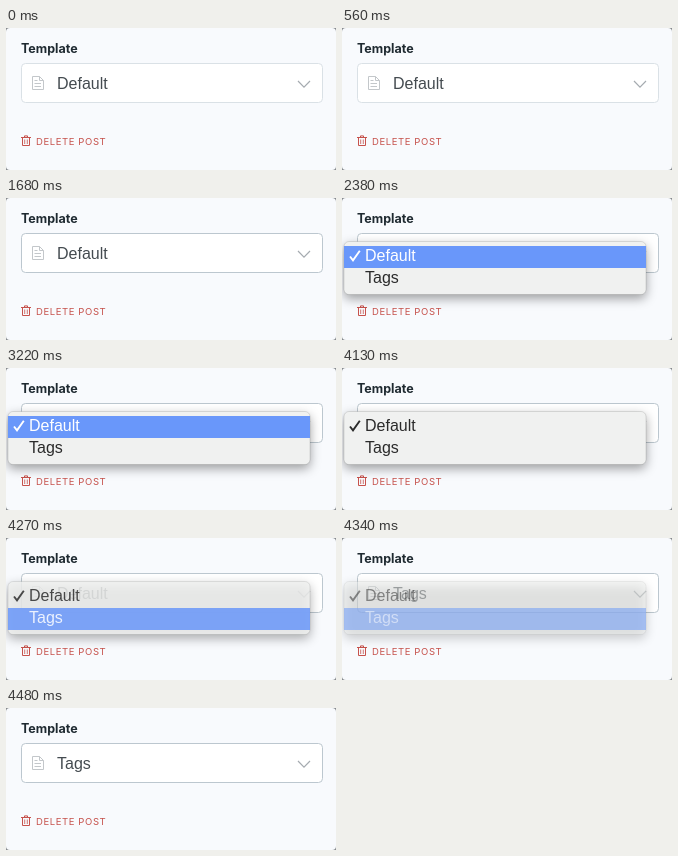
These frames come from a looping animation (330x142 px, 6510 ms). An HTML page with a canvas:

```html
<!DOCTYPE html>
<html lang="en">
<head>
<meta charset="utf-8">
<title>Template select</title>
<style>
html, body { margin: 0; width: 330px; height: 142px; overflow: hidden; background: #f8fafd; }
canvas { display: block; }
</style>
</head>
<body>
<canvas id="stage" width="330" height="142"></canvas>
<script>
const ctx = document.getElementById('stage').getContext('2d');
const W = 330, H = 142, LOOP = 6510, STEP = 70;
const SANS = '"Liberation Sans", Arial, sans-serif';
const UI = 'Inter, "Open Sans", sans-serif';
const BLUE = '#6997fa';

const FOCUS = 1610, OPEN = 2380, HOVER = 3360, BLINK = 4130, FADE = 4270, CLOSED = 4480;

function text(str, x, y, font, color, spacing = 0) {
  ctx.font = font;
  ctx.fillStyle = color;
  ctx.letterSpacing = spacing + 'px';
  ctx.fillText(str, x, y);
}

function line(points, color, width = 1) {
  ctx.beginPath();
  points.forEach(([x, y], i) => i ? ctx.lineTo(x, y) : ctx.moveTo(x, y));
  ctx.strokeStyle = color;
  ctx.lineWidth = width;
  ctx.stroke();
}

function box(x, y, w, h, r) {
  ctx.beginPath();
  ctx.roundRect(x, y, w, h, r);
}

function panel() {
  ctx.fillStyle = '#85898d';
  ctx.fillRect(0, 0, W, H);
  ctx.fillStyle = '#f8fafd';
  box(0, 0, W, H, 4);
  ctx.fill();
}

function pageIcon() {
  const c = '#c3c7ca';
  line([[33.5, 48.5], [26.5, 48.5], [26.5, 61.5], [37.5, 61.5], [37.5, 52.5], [33.5, 48.5]], c);
  line([[33.5, 48.5], [33.5, 52.5], [37.5, 52.5]], c);
  line([[28.5, 52.5], [31.5, 52.5]], c);
  line([[28.5, 55.5], [35, 55.5]], c);
  line([[28.5, 58.5], [35, 58.5]], c);
}

function trashIcon() {
  const c = '#c6524c';
  line([[15, 109.5], [25, 109.5]], c);
  line([[18.5, 109], [18.5, 107.9], [21.5, 107.9], [21.5, 109]], c);
  line([[16.5, 110], [16.5, 117.5], [23.5, 117.5], [23.5, 110]], c);
  line([[18.7, 111.5], [18.7, 116]], c, 0.8);
  line([[21.3, 111.5], [21.3, 116]], c, 0.8);
}

function field(value, focus) {
  const mix = (a, b) => Math.round(a + (b - a) * focus);
  ctx.fillStyle = '#fff';
  box(15.5, 35.5, 301, 39, 4);
  ctx.fill();
  ctx.strokeStyle = `rgb(${mix(218, 188)},${mix(225, 199)},${mix(230, 207)})`;
  ctx.lineWidth = 1;
  ctx.stroke();
  pageIcon();
  text(value, 51, 61, '16px ' + SANS, '#444b50');
  line([[292, 53], [298, 59.2], [304, 53]], '#a5abb0', 1.2);
}

function menu(active, alpha) {
  ctx.save();
  ctx.globalAlpha = alpha;
  ctx.shadowColor = 'rgba(0,0,0,.38)';
  ctx.shadowBlur = 11;
  ctx.shadowOffsetY = 4;
  ctx.fillStyle = '#f0f1f0';
  box(2, 43.5, 302, 53, 5);
  ctx.fill();
  ctx.shadowColor = 'transparent';
  ctx.strokeStyle = 'rgba(0,0,0,.16)';
  ctx.lineWidth = 0.7;
  ctx.stroke();
  if (active >= 0) {
    ctx.fillStyle = BLUE;
    ctx.fillRect(2, 48 + active * 22, 302, 22);
  }
  const ink = i => i === active ? '#fff' : '#2b2b2b';
  line([[8, 58.5], [11, 62.3], [17.8, 52.8]], ink(0), 1.9);
  ['Default', 'Tags'].forEach((name, i) => text(name, 23, 63 + i * 22, '16px ' + SANS, ink(i)));
  ctx.restore();
}

function draw(t) {
  panel();
  text('Template', 15, 24.5, '700 12.5px ' + UI, '#1f2a31');
  const focus = t < FOCUS ? 0 : t < FOCUS + STEP ? 0.5 : 1;
  field(t < FADE + STEP ? 'Default' : 'Tags', focus);
  trashIcon();
  text('DELETE POST', 30, 117, '400 9.5px ' + UI, '#c6524c', 0.6);

  if (t >= OPEN && t < CLOSED) {
    const blink = t >= BLINK && t < BLINK + STEP;
    const active = t < HOVER ? 0 : blink ? -1 : 1;
    const alpha = t < FADE ? 1 : 0.85 - 0.33 * Math.floor((t - FADE) / STEP);
    menu(active, alpha);
  }
}

const start = performance.now();
function tick() {
  draw((performance.now() - start) % LOOP);
  requestAnimationFrame(tick);
}
tick();
</script>
</body>
</html>
```
